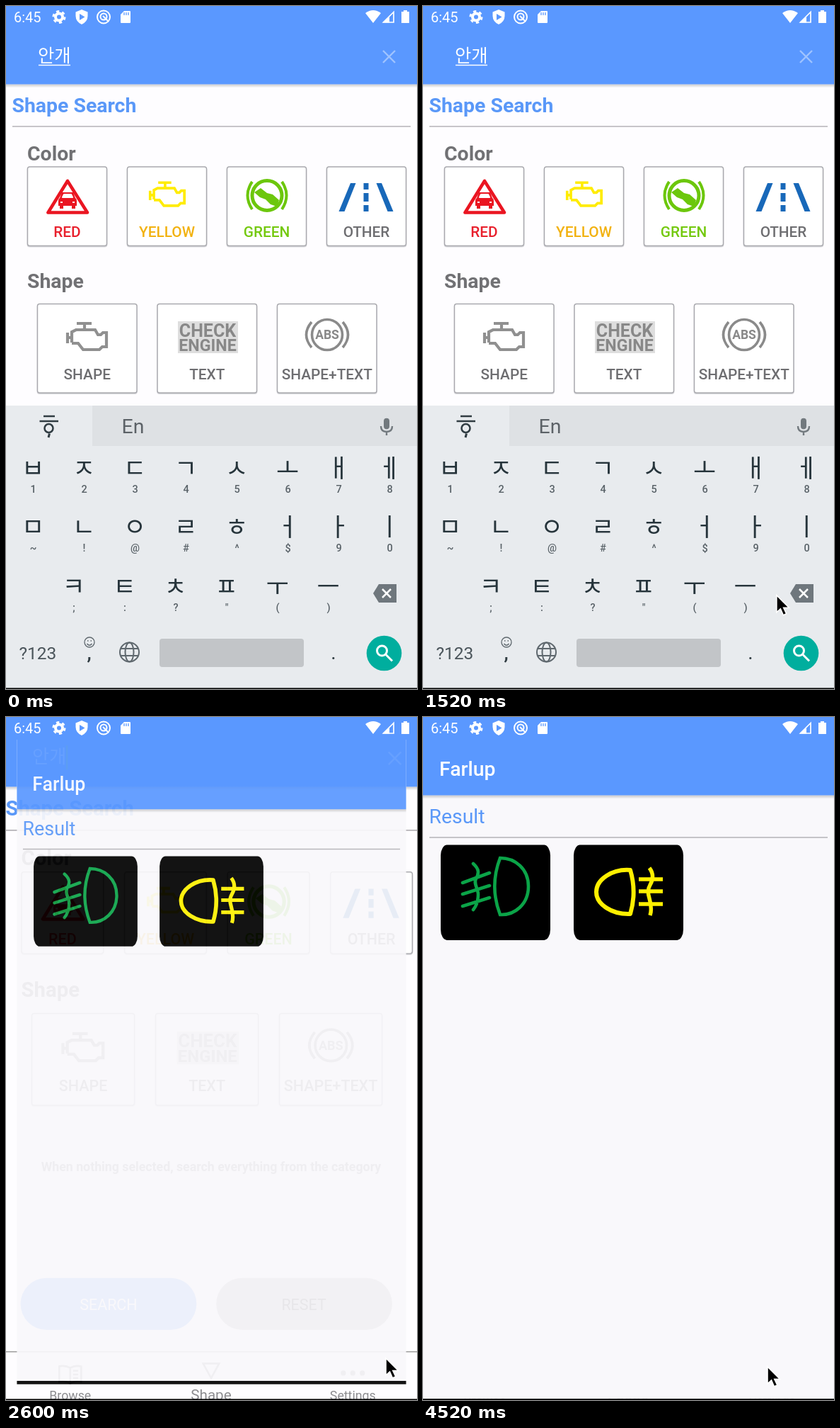
An HTML page that plays this animation: 581x964 px, repeating every 4560 ms.

```html
<!DOCTYPE html>
<html lang="ko">
<head>
<meta charset="utf-8">
<style>
html, body { margin: 0; width: 100%; height: 100%; overflow: hidden; background: #000; }
svg { display: block; width: 100%; height: 100%; }
text { font-family: Roboto, "Noto Sans CJK KR", "Noto Sans CJK", sans-serif; }
.c { text-anchor: middle; }
.b { font-weight: 700; }
.m { font-weight: 500; }
.h { font-size: 28.4px; }
.l { font-size: 20.8px; }
.ko { font-family: "Noto Sans CJK KR", "Noto Sans CJK", sans-serif; }
.o { fill: none; }
</style>
</head>
<body>
<svg viewBox="0 0 581 964" preserveAspectRatio="none">
<defs>
  <linearGradient id="shade" x2="0" y2="1">
    <stop stop-opacity=".2"/><stop offset="1" stop-opacity="0"/>
  </linearGradient>
  <path id="engine" class="o" stroke-width="4.2" d="M15 2H36M26 2V10M2 15V30M2 22H8M8 29V14L14 11H41L45 18H49L52 15H57V35H51L47 39H24L17 30H8"/>
  <path id="lane" d="M487 250H494.500L478.500 290H470.500Z"/>
</defs>

<g id="search">
  <rect width="581" height="964" fill="#fefdff"/>
  <rect y="110.500" width="581" height="5" fill="url(#shade)"/>
  <rect width="581" height="110.500" fill="#5a98ff"/>
  <text x="45" y="78.500" class="ko" font-size="25.4" fill="#fff">안개</text>
  <path id="underline" d="M46 83.5H91" stroke="#fff" stroke-width="1.5"/>
  <path id="caret" d="M92.5 54V87" stroke="#7be05a" stroke-width="2.5"/>
  <path id="clear" d="M533 63L550 80M550 63L533 80" stroke="#fff" stroke-width="2.4"/>

  <text x="8.500" y="149.700" class="b h" fill="#5a98f8">Shape Search</text>
  <path d="M9 170H572" stroke="#b4b3b7" stroke-width="1.7"/>
  <g class="b h" fill="#717174"><text x="30" y="218">Color</text><text x="30" y="398">Shape</text></g>
  <g id="cards"></g>

  <g stroke="#ea1521" stroke-linejoin="round">
    <path class="o" stroke-width="4.600" d="M87 247L59.500 291.500H115Z"/>
    <path fill="#ea1521" stroke="none" d="M79 263H95L98 271Q100 272 100 275V282H98V286H93V282H81V286H76V282H74V275Q74 272 76 271Z"/>
    <path stroke="#fff" stroke-width="2" d="M80 270L82 266H92L94 270ZM77 277H80M94 277H97" fill="#fff"/>
  </g>
  <use href="#engine" transform="translate(202 247.500) scale(.88)" stroke="#ffec00"/>
  <g stroke="#6cc70c" class="o">
    <circle cx="369" cy="267.500" r="21" stroke-width="5"/>
    <path stroke-width="4" d="M348 248Q335 267 348 287M390 248Q403 267 390 287"/>
    <path fill="#6cc70c" stroke="none" d="M351 263L360 257L369 264L377 266L386 274L383 283L374 280L367 273L359 270Z"/>
  </g>
  <g fill="#1868b9">
    <use href="#lane"/><use href="#lane" transform="matrix(-1 0 0 1 1018 0)"/>
    <path d="M505.500 250H512.500V259H505.500ZM505.500 264H512.500V276H505.500ZM505.500 281H512.500V290H505.500Z"/>
  </g>
  <use href="#engine" transform="translate(85 446)" stroke="#909090"/>
  <rect x="243" y="445" width="85" height="45" fill="#dedede"/>
  <g class="b c" fill="#888"><text x="285" y="466.500" font-size="25">CHECK</text><text x="285" y="486.500" font-size="23.200">ENGINE</text>
    <text x="454" y="470" font-size="17.500">ABS</text></g>
  <g class="o" stroke="#8a8a8a" stroke-width="3.600">
    <circle cx="454" cy="464" r="21.500"/>
    <path d="M432 446Q417 464 432 482M476 446Q491 464 476 482"/>
  </g>

  <text x="290" y="636" class="b c" font-size="17.200" fill="#808084">When nothing selected, search everything from the category</text>
  <rect x="29" y="782" width="241" height="71" rx="35.500" fill="#5a98ff"/>
  <rect x="297" y="782" width="241" height="71" rx="35.500" fill="#aaa9ab"/>
  <text x="149.500" y="826" class="c l" fill="#fff">SEARCH</text>
  <text x="417" y="826" class="c l" fill="#1e1e20">RESET</text>
  <path d="M0 883H581" stroke="#aaa" stroke-width="1.700"/>
  <g class="c" fill="#8d8d90">
    <text x="97" y="949" font-size="17.200">Browse</text>
    <text x="290" y="949" font-size="20">Shape</text>
    <text x="484" y="949" font-size="17.200">Settings</text>
    <circle cx="471" cy="912" r="3.500"/><circle cx="484" cy="912" r="3.500"/><circle cx="497" cy="912" r="3.500"/>
  </g>
  <path class="o" stroke="#8d8d90" stroke-width="2.500" d="M279 899H301L290 919ZM97 905Q90 901 82 903V924Q90 922 97 926Q104 922 112 924V903Q104 901 97 905V926M101 909H108M101 914H108M101 919H108"/>
</g>

<g id="result">
  <rect width="581" height="962.500" fill="#f9f8fb"/>
  <rect y="962.500" width="581" height="5"/>
  <rect y="110.500" width="581" height="5" fill="url(#shade)"/>
  <rect width="581" height="110.500" fill="#5a98ff"/>
  <text x="23" y="83" class="m h" fill="#fff">Farlup</text>
  <text x="8.500" y="149.700" class="h" fill="#5a98f8">Result</text>
  <path d="M9 170H572" stroke="#b4b3b7" stroke-width="1.700"/>
  <rect x="25" y="180.500" width="155" height="134.500" rx="9" ry="15"/>
  <rect x="213" y="180.500" width="155" height="134.500" rx="9" ry="15"/>
  <g class="o" stroke="#0ba448" stroke-width="4.600" stroke-linecap="round">
    <path d="M109 199C130 199 149 214 149 239S130 280 109 279C99 253 99 225 109 199Z"/>
    <path d="M56 234L94 220M56 250L94 238M56 267L94 255M71 207C80 215 79 221 75 228S78 243 78 250 77 265 71 272"/>
  </g>
  <g class="o" stroke="#fff000" stroke-width="6">
    <path stroke-linejoin="round" d="M293 216C268 214 245 229 245 247S268 279 293 278C299 258 299 236 293 216Z"/>
    <path stroke-width="5.500" d="M305 229H339M305 246H339M305 264H339M320 213C327 222 325 230 321 237S318 249 320 256 324 271 321 280"/>
  </g>
</g>

<g id="keyboard">
  <rect y="564" width="581" height="400" fill="#e8ebee"/>
  <rect x="122" y="564" width="459" height="57" fill="#dee1e4"/>
  <g class="o" stroke="#303c42" stroke-width="2.500">
    <path d="M53 579H69M47.500 586H74"/><circle cx="60.500" cy="596" r="6"/>
    <path stroke-width="3" d="M61.500 603.500L60 609"/>
  </g>
  <text x="163.500" y="603" class="h" fill="#5c6267">En</text>
  <g class="o" stroke="#72797e" stroke-width="2.400">
    <rect x="535.200" y="583" width="5.600" height="13" rx="2.800" fill="#72797e"/>
    <path d="M530 593Q530 601 538 601T546 593M538 601V606"/>
  </g>
  <g id="keys"></g>
  <path d="M519 829L527 816H552V842H527Z" fill="#6f777d"/>
  <path d="M532 823L544 835M544 823L532 835" stroke="#fff" stroke-width="2.500"/>
  <text x="18.500" y="922" font-size="24.500" fill="#4b555b">?123</text>
  <g class="c" fill="#303c42"><text x="117.500" y="922" class="m" font-size="28">,</text><text x="463" y="922" font-size="28">.</text></g>
  <g class="o" stroke="#5f686e" stroke-width="1.300">
    <circle cx="118" cy="898" r="7"/><path d="M114.500 900Q118 904.500 121.500 900M115 896H116.500M119.500 896H121"/>
    <g stroke-width="2"><circle cx="174.500" cy="912" r="13.500"/><ellipse cx="174.500" cy="912" rx="6" ry="13.500"/><path d="M162 907H187M162 917H187"/></g>
  </g>
  <rect x="217" y="893" width="204" height="40" rx="4" fill="#c2c5c8"/>
  <circle cx="534.500" cy="913.500" r="24.800" fill="#00ae9e"/>
  <g class="o" stroke="#fff" stroke-width="3"><circle cx="531.500" cy="910" r="7"/><path d="M537 915.500L546 924.500"/></g>
</g>

<g id="status" fill="#fff">
  <rect width="581" height="32" fill="#5a98ff"/>
  <text x="11" y="23" font-size="20">6:45</text>
  <circle cx="75" cy="15.500" r="5" class="o" stroke="#fff" stroke-width="4"/>
  <circle cx="75" cy="15.500" r="8" class="o" stroke="#fff" stroke-width="3" stroke-dasharray="4.200 4.178"/>
  <path d="M107 5L115.500 8.500V14Q115.500 22 107 26Q98.500 22 98.500 14V8.500Z"/>
  <path d="M104 11L111.500 15.500L104 20Z" fill="#5a98ff"/>
  <g class="o" stroke="#fff" stroke-width="2"><circle cx="138" cy="15.500" r="9"/><circle cx="138" cy="15" r="4.500"/><path d="M137 14L145 22"/></g>
  <path d="M167 7H175Q176 7 176 8V23Q176 24 175 24H163Q162 24 162 23V12Z"/>
  <path d="M167 9V13M170 9V13M173 9V13" stroke="#5a98ff" stroke-width="1.300"/>
  <path d="M508 10Q519 2 530 10L519 24Z"/>
  <path d="M533.500 23H548V8.500Z" class="o" stroke="#fff" stroke-width="1.700"/><path d="M533 23.500L542 14.500V23.500Z"/>
  <path d="M559 8H562V6H567V8H570V24H559Z"/>
</g>
<rect y="962.500" width="581" height="1.500"/>
<path id="pointer" d="M0 0V24L5.500 19L9.500 28L13.800 26L9.800 17.500H17.500Z" stroke="#fff" stroke-width="1.600"/>
</svg>
<script>
const $ = id => document.getElementById(id);
const LOOP = 4560, PRESS = 2400, OPEN = 2520;

function card(x, y, w, h, label, labelY, fill) {
  return `<rect x="${x}" y="${y + 1}" width="${w}" height="${h}" rx="3" fill="#fff" stroke="#d8d8dc" stroke-width="2"/>
    <rect x="${x}" y="${y}" width="${w}" height="${h}" rx="3" fill="#fff" stroke="#a9a9ae" stroke-width="1.4"/>
    <text x="${x + w / 2}" y="${labelY}" class="c m l" fill="${fill}">${label}</text>`;
}
const colors = [["RED", "#e8202c"], ["YELLOW", "#f2b210"], ["GREEN", "#74c90e"], ["OTHER", "#6e6e71"]];
$("cards").innerHTML =
  colors.map(([name, fill], i) => card(30.5 + 141 * i, 227, 112, 111.5, name, 326, fill)).join("") +
  ["SHAPE", "TEXT", "SHAPE+TEXT"].map((name, i) => card(44.5 + 169.5 * i, 420.5, 140.5, 125.5, name, 526.5, "#6e6e71")).join("");

const rows = [["ㅂㅈㄷㄱㅅㅗㅐㅔ", "12345678", 38], ["ㅁㄴㅇㄹㅎㅓㅏㅣ", "~!@#^$90", 38], ["ㅋㅌㅊㅍㅜㅡ", ";:?\"()", 95.5]];
$("keys").innerHTML = rows.map(([main, sub, left], r) => [...main].map((ch, i) => {
  const x = left + 72 * i, y = 687 + 83.3 * r;
  return `<text x="${x}" y="${y - 22}" class="c ko" font-size="35" fill="#26343b">${ch}</text>
    <text x="${x + 0.5}" y="${y}" class="c m" font-size="14.5" fill="#596268">${sub[i]}</text>`;
}).join("")).join("");

const clamp = v => Math.min(1, Math.max(0, v));
const cubic = (a, b, c, d, s) => a * (1 - s) ** 3 + 3 * b * s * (1 - s) ** 2 + 3 * c * s * s * (1 - s) + d * s ** 3;

// Fast start, very slow settle: two joined Bezier curves solved for x.
function settle(x) {
  const [px, py] = x < 1 / 6
    ? [[0, .05, .1333, 1 / 6], [0, 0, .06, .4]]
    : [[1 / 6, .2083, .25, 1], [.4, .82, 1, 1]];
  let lo = 0, hi = 1;
  for (let i = 0; i < 20; i++) {
    const mid = (lo + hi) / 2;
    if (cubic(...px, mid) < x) lo = mid; else hi = mid;
  }
  return cubic(...py, lo);
}

// Pointer stops: time, x, y
const stops = [[720, 590, 872], [1000, 397, 851], [1240, 397, 851], [1700, 552, 822], [1960, 534, 805],
  [2200, 537, 905], [2920, 537, 905], [3280, 488, 917], [3600, 487, 917], [LOOP, 487, 917]];
function pointerAt(t) {
  const i = stops.findIndex(s => s[0] > t);
  if (i < 1) return [590, 872];
  const [t0, x0, y0] = stops[i - 1], [t1, x1, y1] = stops[i];
  const p = (t - t0) / (t1 - t0), e = p * p * (3 - 2 * p);
  return [x0 + (x1 - x0) * e, y0 + (y1 - y0) * e];
}

const show = (id, on) => $(id).style.display = on ? "" : "none";
const zoom = (id, k) => $(id).setAttribute("transform", `translate(290.5 482) scale(${k}) translate(-290.5 -482)`);

function draw(t) {
  const pressed = t >= PRESS;
  show("underline", !pressed);
  show("caret", pressed);
  $("clear").setAttribute("opacity", pressed ? 1 : .42);

  const hide = clamp((t - PRESS) / 200);
  $("keyboard").setAttribute("transform", `translate(0 ${40 * hide})`);
  $("keyboard").setAttribute("opacity", 1 - hide ** 2.5);

  const open = settle(clamp((t - OPEN) / 400));
  zoom("search", 1 + .05 * open);
  zoom("result", .85 + .15 * open);
  $("result").setAttribute("opacity", clamp((t - OPEN - 35) / 50));
  $("pointer").setAttribute("transform", `translate(${pointerAt(t)})`);
}

const start = performance.now();
function frame() {
  draw((performance.now() - start) % LOOP);
  requestAnimationFrame(frame);
}
frame();
</script>
</body>
</html>
```
